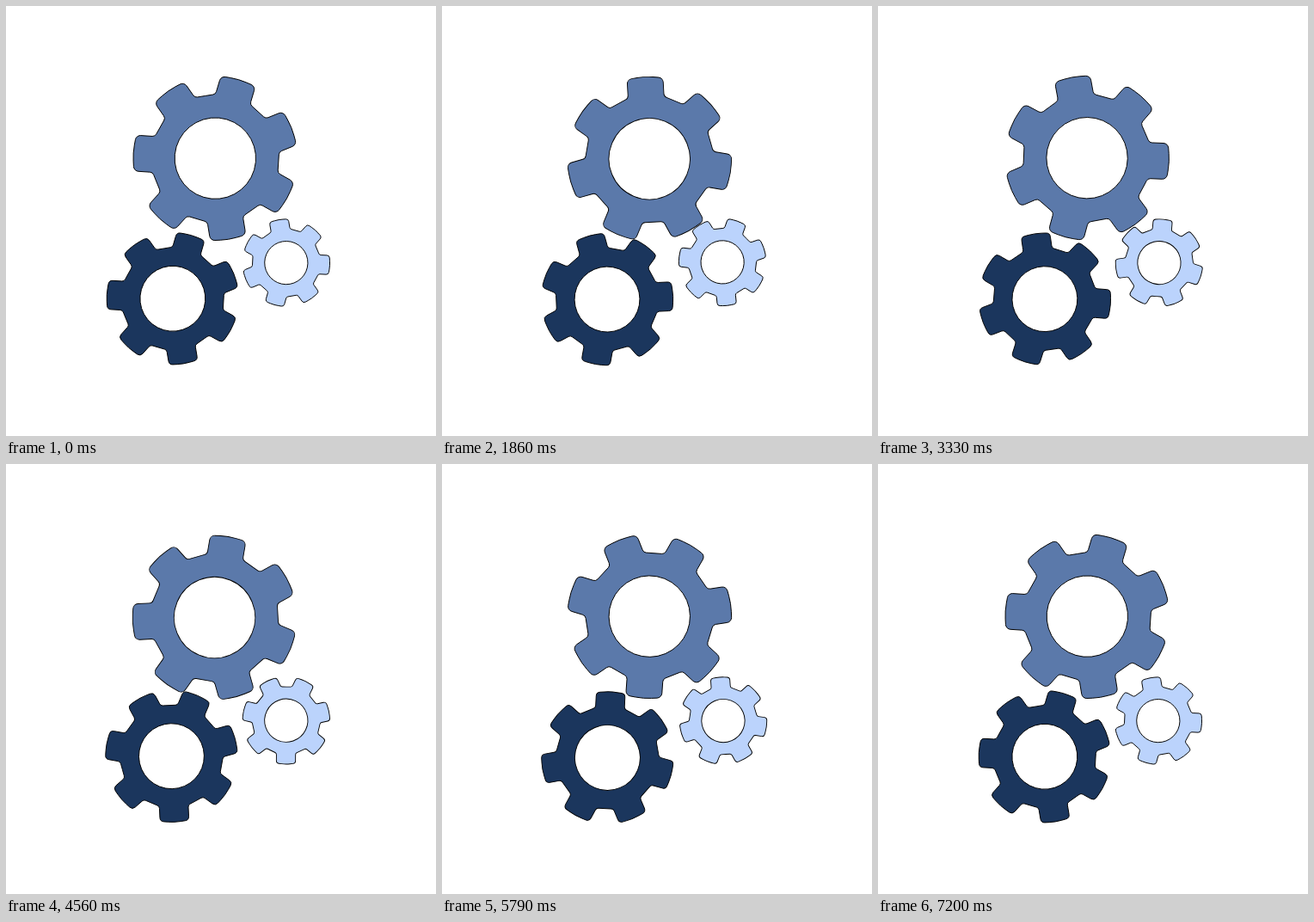
Write an HTML page with a canvas that moves like this. It is 500 by 500 pixels and loops after 7260 ms.

```html
<!DOCTYPE html>
<html lang="en">
<head>
<meta charset="utf-8">
<title>Gears</title>
<style>
  html, body { margin: 0; height: 100%; overflow: hidden; background: #fff; }
  canvas { display: block; }
</style>
</head>
<body>
<canvas id="stage" width="500" height="500"></canvas>
<script>
const ctx = document.getElementById('stage').getContext('2d');
const STEP = 30, STEPS = 240, LOOP = 7260;
const TEETH = 7, HOLE = 47.2;
const rad = deg => deg * Math.PI / 180;

// Tooth corners pointing up, as x, y and rounding radius
const TOOTH = [
  [-20.9, -71.6, 5], [-20.9, -93.5, 6], [0, -95.9, 80], [20.9, -93.5, 6], [20.9, -71.6, 5]
];

// off: distance and direction of the gear's centre from its pivot
const gears = [
  { x: 242.3, y: 177.5, size: 1, color: '#5b79aa', turns: 2, start: 16.55, off: [1.1, -20] },
  { x: 192.9, y: 340.6, size: 0.804, color: '#1b365d', turns: -2, start: 16.2, off: [1, -22] },
  { x: 326.4, y: 298.4, size: 0.532, color: '#bbd3fc', turns: -3, start: -9.9, off: [0.6, 160] }
];

function gearPath() {
  const points = [];
  for (let i = 0; i < TEETH; i++) {
    const a = 2 * Math.PI * i / TEETH, c = Math.cos(a), s = Math.sin(a);
    for (const [x, y, r] of TOOTH) points.push([x * c - y * s, x * s + y * c, r]);
  }
  const path = new Path2D(), [first] = points, last = points[points.length - 1];
  path.moveTo((first[0] + last[0]) / 2, (first[1] + last[1]) / 2);
  points.forEach(([x, y, r], i) => {
    const next = points[(i + 1) % points.length];
    path.arcTo(x, y, next[0], next[1], r);
  });
  path.closePath();
  path.moveTo(HOLE, 0);
  path.arc(0, 0, HOLE, 0, 2 * Math.PI);
  return path;
}

const shape = gearPath();

function drawGear({ x, y, size, color, turns, start, off: [dist, dir] }, progress) {
  ctx.save();
  ctx.translate(x, y);
  ctx.rotate(2 * Math.PI * turns * progress);
  ctx.translate(dist * Math.cos(rad(dir)), dist * Math.sin(rad(dir)));
  ctx.rotate(rad(start));
  ctx.scale(size, size);
  ctx.fillStyle = color;
  ctx.fill(shape, 'evenodd');
  ctx.lineWidth = 0.9 / size;
  ctx.strokeStyle = '#000';
  ctx.stroke(shape);
  ctx.restore();
}

function draw() {
  const step = Math.min(Math.floor(performance.now() % LOOP / STEP), STEPS);
  ctx.fillStyle = '#fff';
  ctx.fillRect(0, 0, 500, 500);
  for (const gear of gears) drawGear(gear, step / STEPS);
  requestAnimationFrame(draw);
}
draw();
</script>
</body>
</html>
```
